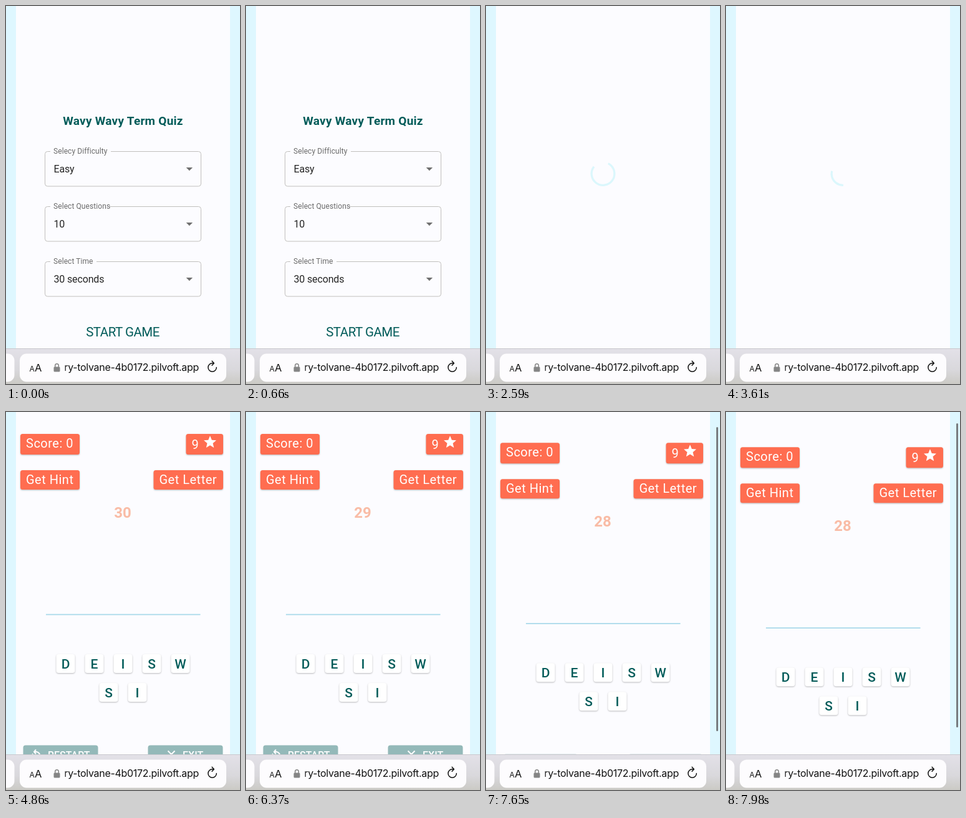
Animation, 375 px wide and 604 px high, one loop 8000 ms. Source, as an HTML page:

```html
<!DOCTYPE html>
<html lang="en">
<head>
<meta charset="utf-8">
<title>Word puzzle</title>
<style>
  html, body { margin: 0; width: 100%; height: 100%; overflow: hidden; background: #fcfcff; }
  svg { display: block; width: 375px; height: 604px; font-family: Roboto, sans-serif; }
  .label { font-size: 12px; fill: #6b6b6b; letter-spacing: .08px; }
  .value { font-size: 16px; fill: #252525; letter-spacing: -.15px; }
  .dark { fill: #005b59; }
  .mid { text-anchor: middle; }
  .chip { fill: #ff6d50; filter: drop-shadow(0 1.5px 1px #0004); }
  .white { fill: #fff; font-size: 20px; letter-spacing: .5px; }
  .tile { fill: #fff; filter: drop-shadow(0 1.5px 1px #0004); }
  .letter { font-size: 21px; font-weight: 500; }
  .action { fill: #94b9b9; }
  .icon { fill: none; stroke: #fff; stroke-width: 2; }
</style>
</head>
<body>
<svg viewBox="0 0 375 604">
  <defs>
    <linearGradient id="chrome" x2="0" y2="1">
      <stop stop-color="#e3e1e8"/><stop offset=".6" stop-color="#d9d8dc"/><stop offset="1" stop-color="#cbcac5"/>
    </linearGradient>
    <linearGradient id="fade">
      <stop offset=".5" stop-color="#fdfcfe"/><stop offset="1" stop-color="#fdfcfe" stop-opacity="0"/>
    </linearGradient>
  </defs>
  <rect width="375" height="604" fill="#fcfcff"/>
  <path d="M0 0h16v604H0zM359 0h16v604h-16z" fill="#def7ff"/>

  <g id="menu">
    <text class="dark mid" x="187.5" y="190" font-size="19" font-weight="700" letter-spacing=".25">Wavy Wavy Term Quiz</text>
    <g id="fields"></g>
    <text class="dark mid" x="187" y="528" font-size="20.5" letter-spacing="-.5">START GAME</text>
  </g>

  <g id="spinner" transform="translate(187.5 268) scale(.909)">
    <circle id="arc" r="20.2" fill="none" stroke="#dbf7fc" stroke-width="3.6"/>
  </g>

  <g id="game">
    <g id="chips"></g>
    <path d="M12 17.27 18.18 21l-1.64-7.03L22 9.24l-7.19-.61L12 2 9.19 8.63 2 9.24l5.46 4.73L5.82 21z" transform="translate(315 36)" fill="#fff"/>
    <text id="timer" class="mid" x="187" y="168.5" font-size="24" font-weight="700" fill="#f9bca6"></text>
    <path d="M64 323.7H311.5" stroke="#a9d9ea" stroke-width="1.7"/>
    <g id="tiles"></g>
    <rect class="action" x="27.5" y="532.5" width="120" height="36" rx="4"/>
    <rect class="action" x="227.5" y="532.5" width="120" height="36" rx="4"/>
    <path class="icon" d="M43 546a6 6 0 1 0 6-3h-4m3-3.5l-3 3.5 3 3.5M259.5 541.5l11 11m0-11l-11 11"/>
    <g fill="#fff" font-size="16" font-weight="500">
      <text x="67" y="553.5">RESTART</text><text x="283" y="553.5">EXIT</text>
    </g>
  </g>
  <rect id="bar" x="369" width="3" height="486" rx="1.5" fill="#777b7f"/>

  <g id="browser">
    <rect y="547" width="375" height="57" fill="url(#chrome)"/>
    <path d="M0 547.5H375" stroke="#c9c8cd"/>
    <rect x="-20" y="555.5" width="33.5" height="45" rx="11" fill="#fdfcfe"/>
    <rect x="22" y="555.5" width="331" height="45" rx="11" fill="#fdfcfe"/>
    <g font-family="Inter, sans-serif" fill="#111">
      <text x="37.5" y="584" font-size="12">A</text>
      <text x="46" y="584" font-size="16.5">A</text>
      <text x="309" y="583" font-size="16" letter-spacing="-.3" text-anchor="end">ry-tolvane-4b0172.pilvoft.app</text>
    </g>
    <rect x="84" y="566" width="12" height="24" fill="url(#fade)"/>
    <rect x="76.5" y="576.5" width="10" height="8" rx="1.5" fill="#858585"/>
    <path d="M78.7 577v-2.5a2.8 2.8 0 0 1 5.6 0v2.5" fill="none" stroke="#858585" stroke-width="1.5"/>
    <path d="M337.3 577.5a6.7 6.7 0 1 1-6.7-6.7h2.5m-3-3.5l3.2 3.5-3.2 3.5" fill="none" stroke="#111" stroke-width="1.5" stroke-linecap="round"/>
  </g>
</svg>
<script>
const $ = id => document.getElementById(id);
const LOOP = 8000, MENU_END = 1480, SPIN_START = 1560, GAME_START = 4650, DRAG_START = 7170;
const SPIN_TIME = 1704, TICK = 1212;

// Outlined select boxes: top, label, notch end, value
$('fields').innerHTML = [
  [232.5, 'Selecy Difficulty', 168, 'Easy'],
  [320.5, 'Select Questions', 165, '10'],
  [408.5, 'Select Time', 145, '30 seconds']
].map(([y, label, notch, value]) => `
  <rect x="62.5" y="${y}" width="250" height="55.5" rx="4" fill="none" stroke="#c1c0bd"/>
  <path d="M71 ${y}H${notch}" stroke="#fcfcff" stroke-width="3"/>
  <text class="label" x="76" y="${y + 3.5}">${label}</text>
  <text class="value" x="76.5" y="${y + 33.5}">${value}</text>
  <path d="M288.7 ${y + 25.5}h10.4l-5.2 5.2z" fill="#707070"/>`).join('');

$('chips').innerHTML = [
  [23, 35, 95, 33, 'Score: 0', 57],
  [288.5, 35, 59.5, 33, '9', 58.5],
  [23, 93, 95, 31, 'Get Hint', 115],
  [236.5, 93, 111.5, 31, 'Get Letter', 115]
].map(([x, y, w, h, label, base]) => `
  <rect class="chip" x="${x}" y="${y}" width="${w}" height="${h}" rx="3.5"/>
  <text class="white" x="${x + 9}" y="${base}">${label}</text>`).join('');

$('tiles').innerHTML = [...'DEISWSI'].map((c, i) => {
  const x = i < 5 ? 95.5 + i * 46 : 164.5 + (i - 5) * 46;
  const y = i < 5 ? 387 : 433;
  return `<rect class="tile" x="${x - 15}" y="${y}" width="30" height="30" rx="4"/>
    <text class="letter dark mid" x="${x}" y="${y + 22.7}">${c}</text>`;
}).join('');

const smooth = x => x * x * (3 - 2 * x);
const show = (id, on) => $(id).style.display = on ? '' : 'none';

function drawSpinner(t) {
  const p = t / SPIN_TIME % 1;
  const grow = smooth(Math.min(1, p * 2)), shrink = smooth(Math.max(0, p * 2 - 1));
  $('arc').setAttribute('stroke-dasharray', `${1 + 99 * grow} 200`);
  $('arc').setAttribute('stroke-dashoffset', -15 * grow - 110 * shrink);
  $('arc').setAttribute('transform', `rotate(${p * 360})`);
}

function draw(t) {
  show('menu', t < MENU_END);
  show('spinner', t >= SPIN_START && t < GAME_START);
  show('game', t >= GAME_START);
  show('bar', t >= DRAG_START);
  drawSpinner(Math.max(0, t - SPIN_START));
  $('timer').textContent = 30 - Math.max(0, Math.floor((t - GAME_START) / TICK));

  // Slowing pull-down past the top edge
  const s = Math.max(0, t - DRAG_START) / 1000;
  const pull = 34.9 * s - 10.6 * s * s;
  $('game').setAttribute('transform', `translate(0 ${pull})`);
  $('bar').setAttribute('y', 36.3 - .86 * pull);
  $('bar').setAttribute('opacity', Math.min(1, s / .15));
}

const begin = performance.now();
function frame() {
  draw((performance.now() - begin) % LOOP);
  requestAnimationFrame(frame);
}
frame();
</script>
</body>
</html>
```
